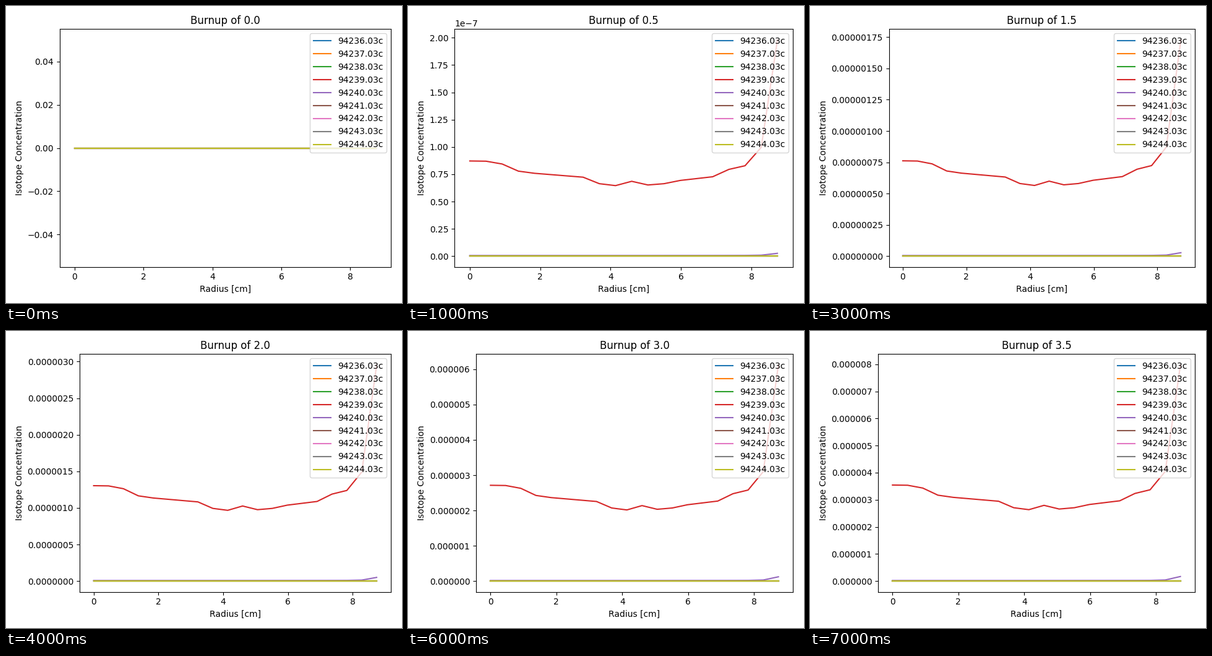
Write a matplotlib script that moves like this. It is 640 px wide and 480 px high and loops after 8 s.

```python
import numpy as np
import matplotlib.pyplot as plt
from matplotlib.animation import FuncAnimation

W, H = 640, 480
RIGHT_EDGE = 621.9  # pixels

plt.rcParams["font.family"] = "DejaVu Sans"
plt.rcParams["axes.formatter.limits"] = (-7, 7)

NODES = np.arange(20)
RADIUS = 0.46 * NODES
ISOTOPES = [f"94{mass}.03c" for mass in range(236, 245)]
MAIN, MINOR = 3, 4

# Bends of the main isotope's profile: node and share of the peak
BENDS = [(0, 0.440), (1, 0.439), (2, 0.426), (3, 0.393), (4, 0.383),
         (7, 0.365), (8, 0.335), (9, 0.326), (10, 0.346), (11, 0.329),
         (12, 0.335), (13, 0.350), (15, 0.367), (16, 0.401), (17, 0.418),
         (18, 0.503), (19, 1.0)]


def peak(burnup):
    """Largest concentration: quadratic at first, then slowing down."""
    rate = 7.92 - 0.585 * max(burnup - 1.09, 0)
    return rate * 1e-7 * burnup ** 2


def main_profile(burnup):
    """Dips in the middle and flattens slightly with burnup."""
    nodes, shares = zip(*BENDS)
    return np.interp(NODES, nodes, shares) ** (1 - 0.001 * burnup ** 2)


def minor_profile(burnup):
    """Almost flat, with a small rise at the rim that grows with burnup."""
    depth = RADIUS / RADIUS[-1]
    rim = 0.0082 + 0.0028 * burnup
    return 0.0026 + 0.0008 * depth ** 4 + rim * depth ** 40


def concentrations(burnup):
    data = np.zeros((len(ISOTOPES), len(RADIUS)))
    data[MAIN] = main_profile(burnup)
    data[MINOR] = minor_profile(burnup)
    return data * peak(burnup)


fig, ax = plt.subplots(figsize=(W / 100, H / 100), dpi=100)


def draw(step):
    burnup = 0.5 * step
    ax.clear()
    for name, values in zip(ISOTOPES, concentrations(burnup)):
        ax.plot(RADIUS, values, label=name)
    ax.set_title(f"Burnup of {burnup}")
    ax.set_xlabel("Radius [cm]")
    ax.set_ylabel("Isotope Concentration")
    ax.legend(loc="upper right")
    # The left edge follows the width of the tick labels
    fig.tight_layout()
    fig.subplots_adjust(right=RIGHT_EDGE / W)
    return ax.lines


anim = FuncAnimation(fig, draw, frames=8, interval=1000, repeat=True)
plt.show()
```
